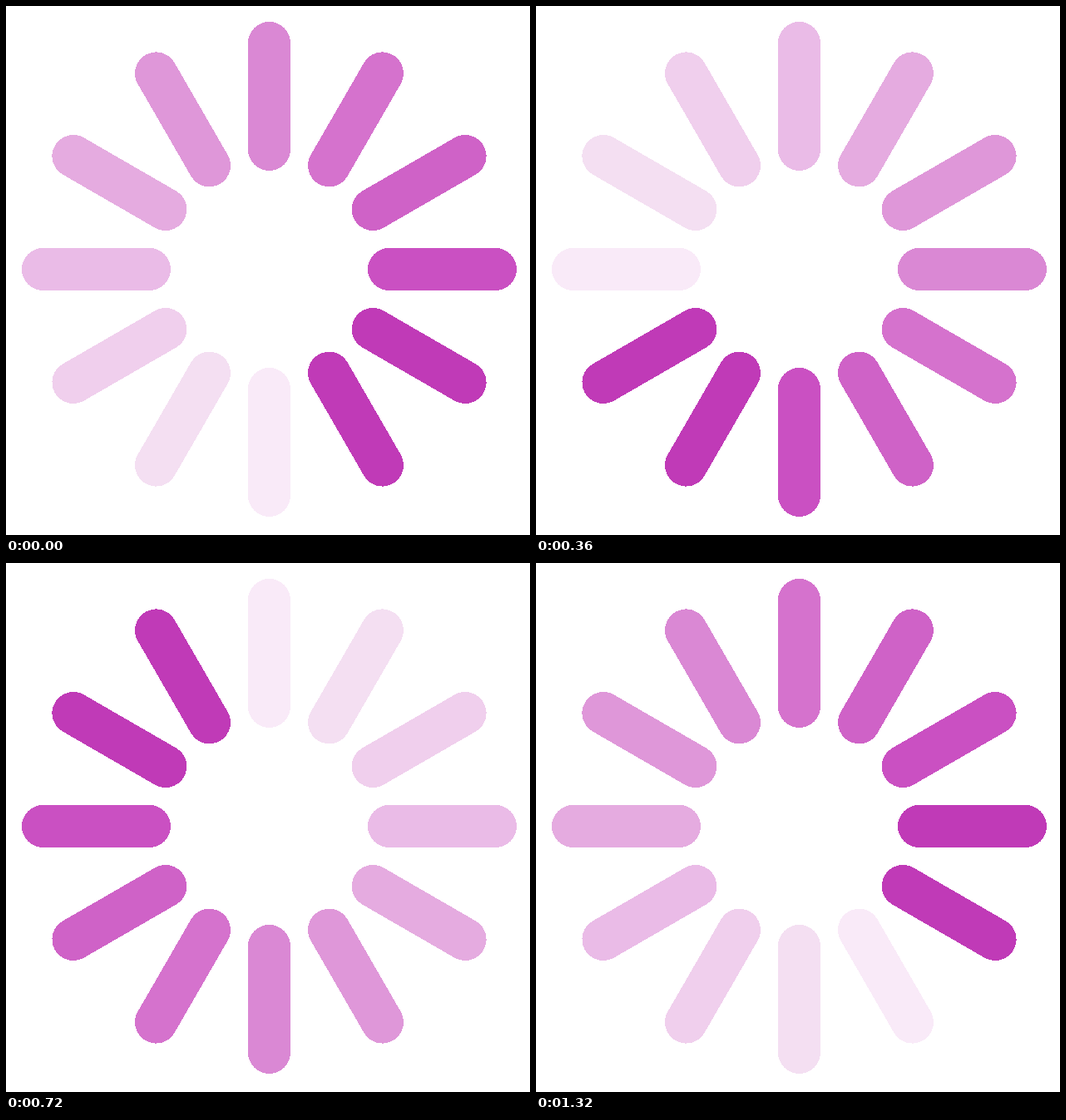
Recreate the animation shown at these times as an HTML page. Size 630 by 636 pixels, loop 1440 ms.

```html
<!DOCTYPE html>
<html lang="en">
<head>
<meta charset="utf-8">
<title>Spinner</title>
<style>
  html, body { margin: 0; width: 100%; height: 100%; overflow: hidden; background: #fff; }
  svg { display: block; width: 100%; height: 100%; }
</style>
</head>
<body>
<svg viewBox="0 0 630 636" preserveAspectRatio="xMidYMid meet">
  <g id="spinner" transform="translate(316.5 316.5)" shape-rendering="crispEdges"></g>
</svg>
<script>
  const COUNT = 12;
  const STEP = 120;
  const HEAD = 5; // clock position of the darkest bar at time zero
  // From the head backwards along the tail
  const SHADES = [
    '#c03ab7', '#c03ab7', '#ca50c2', '#cf62c7', '#d572cd', '#da88d4',
    '#df97d9', '#e5abe0', '#eabbe7', '#f0cfed', '#f4dff2', '#f9eaf8'
  ];

  const spinner = document.getElementById('spinner');

  function makeBar(hour) {
    const bar = document.createElementNS('http://www.w3.org/2000/svg', 'rect');
    const attrs = {
      x: -25.5, y: -297.5, width: 51, height: 179, rx: 25.5,
      transform: `rotate(${hour * 360 / COUNT})`
    };
    for (const name in attrs) bar.setAttribute(name, attrs[name]);
    return spinner.appendChild(bar);
  }

  const bars = Array.from({ length: COUNT }, (_, hour) => makeBar(hour));

  function draw(ms) {
    const head = HEAD + Math.floor(ms / STEP) % COUNT;
    bars.forEach((bar, hour) => {
      bar.setAttribute('fill', SHADES[(head - hour + COUNT) % COUNT]);
    });
  }

  const start = performance.now();
  function tick(now) {
    draw(Math.max(0, now - start));
    requestAnimationFrame(tick);
  }
  draw(0);
  requestAnimationFrame(tick);
</script>
</body>
</html>
```
